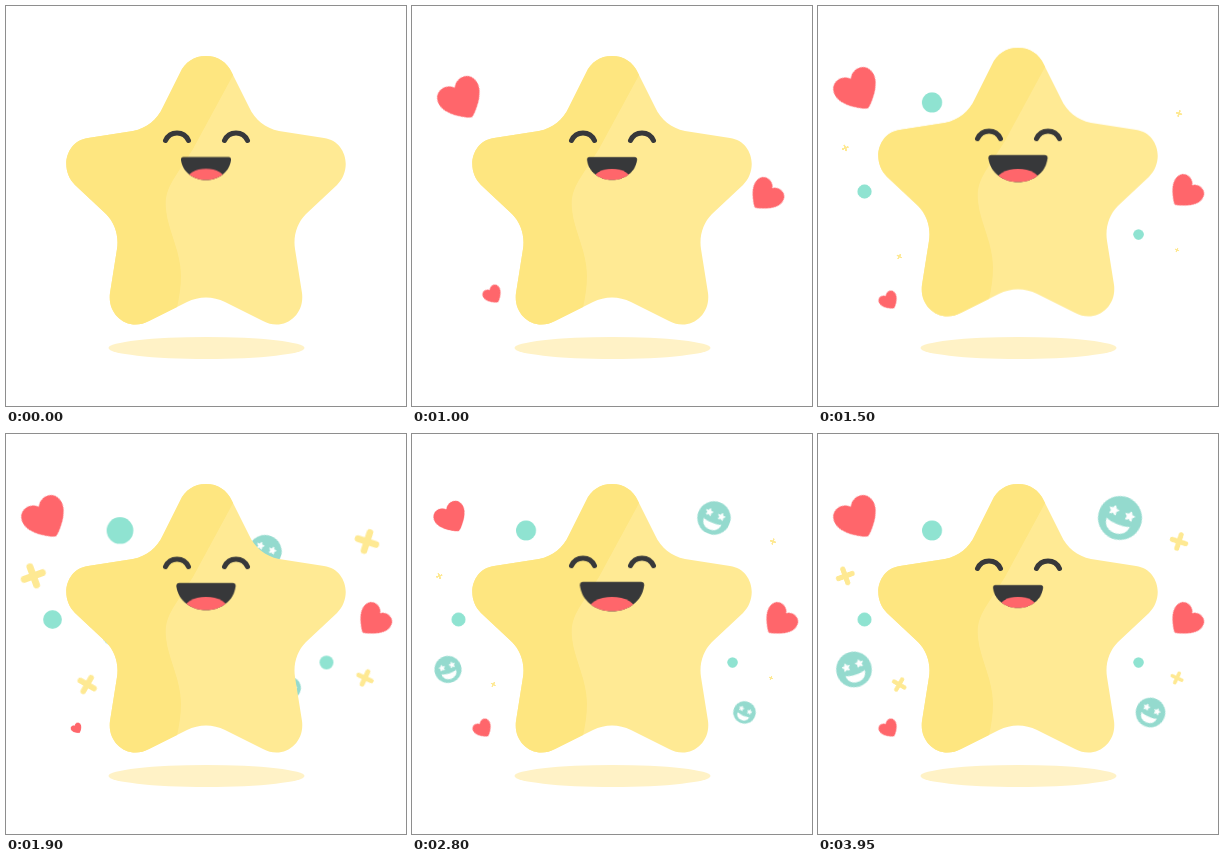
An HTML page for the animation above (5 s loop, 400x400 px).

```html
<!DOCTYPE html>
<html lang="en">
<head>
<meta charset="utf-8">
<title>Happy star</title>
<style>
  html, body { margin: 0; width: 100%; height: 100%; overflow: hidden; background: #fff; }
  svg { display: block; width: 100%; height: 100%; }

  .fly, .beat, .pop, .twinkle, .grow, .jump, .laugh, .lift {
    animation: 5s infinite both cubic-bezier(.364, 0, .636, 1);
  }
  .fly { animation-timing-function: cubic-bezier(.333, .667, .667, 1); }
  .heart .fly { animation-name: fly-heart; }
  .face .fly { animation-name: fly-face; }
  .beat { animation-name: beat; animation-delay: var(--d, 0s); }
  .pop { animation-name: pop; }
  .twinkle { animation-name: twinkle; }
  .grow { animation-name: grow; }
  .jump { animation-name: jump; }
  .laugh { animation-name: laugh; }
  .lift { animation-name: lift; }

  /* 1% = 50 ms */
  @keyframes fly-heart {
    0%, 6% { transform: translate(var(--x), var(--y)); }
    26%, 100% { transform: translate(0, 0); }
  }
  @keyframes fly-face {
    0%, 32% { transform: translate(var(--x), var(--y)); }
    52%, 100% { transform: translate(0, 0); }
  }
  @keyframes beat {
    0%, 32%, 46%, 100% { transform: scale(1); }
    39% { transform: scale(.56); }
  }
  @keyframes pop {
    0%, 22.4% { transform: scale(0); }
    34.4% { transform: scale(1.43); }
    46%, 100% { transform: scale(1); }
  }
  @keyframes twinkle {
    0%, 26% { transform: scale(0); }
    37.6% { transform: scale(1.34); }
    45%, 49%, 63%, 100% { transform: scale(1); }
    56% { transform: scale(.34); }
  }
  @keyframes grow {
    0%, 65% { transform: scale(.76); }
    79%, 100% { transform: scale(1); }
  }
  @keyframes jump {
    0%, 20%, 34%, 100% { transform: translateY(0); }
    27% { transform: translateY(-13.5px); }
  }
  @keyframes laugh {
    0%, 6%, 20%, 34%, 48%, 62%, 76%, 100% { transform: scale(1); }
    13%, 27%, 41%, 55%, 69% { transform: scale(1.3); }
  }
  @keyframes lift {
    0%, 6%, 20%, 34%, 48%, 62%, 76%, 100% { transform: translateY(0); }
    13%, 27%, 41%, 55%, 69% { transform: translateY(-3px); }
  }
</style>
</head>
<body>
<svg viewBox="0 0 400 400">
  <defs>
    <path id="heart" fill="#ff666b" d="M0-10C4-18 20-18 20-4C20 6 8 16 2 20Q0 21.5-2 20C-8 16-20 6-20-4C-20-18-4-18 0-10Z"/>
    <path id="cross" fill="none" stroke="#fee993" stroke-width="5" stroke-linecap="round" d="M-7 0H7M0-7V7"/>
    <path id="spark" fill="#fff" stroke="#fff" stroke-linejoin="round" d="M0-5L1.5-2L4.8-1.5L2.4.8L2.9 4L0 2.5L-2.9 4L-2.4.8L-4.8-1.5L-1.5-2Z"/>
    <g id="face">
      <circle r="22" fill="#94dace"/>
      <use href="#spark" x="-8.5" y="-5"/>
      <use href="#spark" x="8.5" y="-5"/>
      <path fill="#fff" d="M-12.5 4.5C-8 7.5 8 7.5 12.5 4.5C12 12 7 16 0 16C-7 16-12 12-12.5 4.5Z"/>
    </g>
    <path id="eye" fill="none" stroke="#37383a" stroke-width="5" stroke-linecap="round" d="M159.5 134.5C164 124.5 178 124.5 182.5 134.5"/>
    <path id="star" d="M200 50C188 50 179 56 174 67L157 101C151 114 141 122 127 125L82 132C60 135 53 163 69 179L100 208C109 217 113 230 111 243L104 287C101 310 123 326 143 315L181 296C193 290 207 290 219 296L257 315C277 326 299 310 296 287L289 243C287 230 291 217 300 208L331 179C347 163 340 135 318 132L273 125C259 122 249 114 243 101L226 67C221 56 212 50 200 50Z"/>
    <path id="mouth" d="M177.5 151H222.5Q225.3 151 225 154C223.5 166 213 174 200 174C187 174 176.500 166 175 154Q174.700 151 177.500 151Z"/>
    <clipPath id="in-star"><use href="#star"/></clipPath>
    <clipPath id="in-mouth"><use href="#mouth"/></clipPath>
  </defs>

  <ellipse cx="200.500" cy="342" rx="98" ry="11" fill="#fff2c6"/>

  <g class="heart">
    <g transform="translate(38.5 82.5)"><g class="fly" style="--x:111px;--y:100px"><g class="beat" style="--d:.7s">
      <use href="#heart" transform="rotate(-30) scale(1.1)"/></g></g></g>
    <g transform="translate(368.5 185.5)"><g class="fly" style="--x:-155px;--y:33px"><g class="beat" style="--d:.35s">
      <use href="#heart" transform="rotate(42) scale(.84)"/></g></g></g>
    <g transform="translate(70.5 294)"><g class="fly" style="--x:111px;--y:-67px"><g class="beat">
      <use href="#heart" transform="rotate(-34) scale(.47)"/></g></g></g>
  </g>

  <g fill="#8fe3d1">
    <g transform="translate(114 96.5)"><circle class="pop" r="10"/></g>
    <g transform="translate(46.5 185.5)"><circle class="pop" r="7"/></g>
    <g transform="translate(320.500 228.500)"><circle class="pop" r="5.2"/></g>
  </g>

  <g transform="translate(361 107.500)"><g class="twinkle"><use href="#cross" transform="rotate(18)"/></g></g>
  <g transform="translate(27.300 142)"><g class="twinkle"><use href="#cross" transform="rotate(-20) scale(1.03)"/></g></g>
  <g transform="translate(81.200 250.500)"><g class="twinkle"><use href="#cross" transform="rotate(30) scale(.84)"/></g></g>
  <g transform="translate(359 244)"><g class="twinkle"><use href="#cross" transform="rotate(25) scale(.74)"/></g></g>

  <g class="face">
    <g transform="translate(302 84)"><g class="fly" style="--x:-88px;--y:69px"><g class="grow">
      <use href="#face" transform="rotate(22)"/></g></g></g>
    <g transform="translate(36 235.500)"><g class="fly" style="--x:150px;--y:-75px"><g class="grow">
      <use href="#face" transform="rotate(-18) scale(.81)"/></g></g></g>
    <g transform="translate(332.500 278.500)"><g class="fly" style="--x:-100px;--y:-50px"><g class="grow">
      <use href="#face" transform="rotate(24) scale(.67)"/></g></g></g>
  </g>

  <g class="jump">
    <use href="#star" fill="#ffea94"/>
    <path clip-path="url(#in-star)" fill="#fee680" d="M238 49L187 143C168 174 158 182 160 203C162 225 175 245 175 270C175 282 173 292 171 302V330H40V40Z"/>
  </g>

  <g class="lift">
    <use href="#eye"/>
    <use href="#eye" x="59"/>
  </g>
  <g transform="translate(200 162.500)"><g class="laugh"><g transform="translate(-200 -162.500)">
    <use href="#mouth" fill="#37383a"/>
    <ellipse cx="200" cy="174" rx="19" ry="11.200" fill="#ff666b" clip-path="url(#in-mouth)"/>
  </g></g></g>
</svg>
</body>
</html>
```
